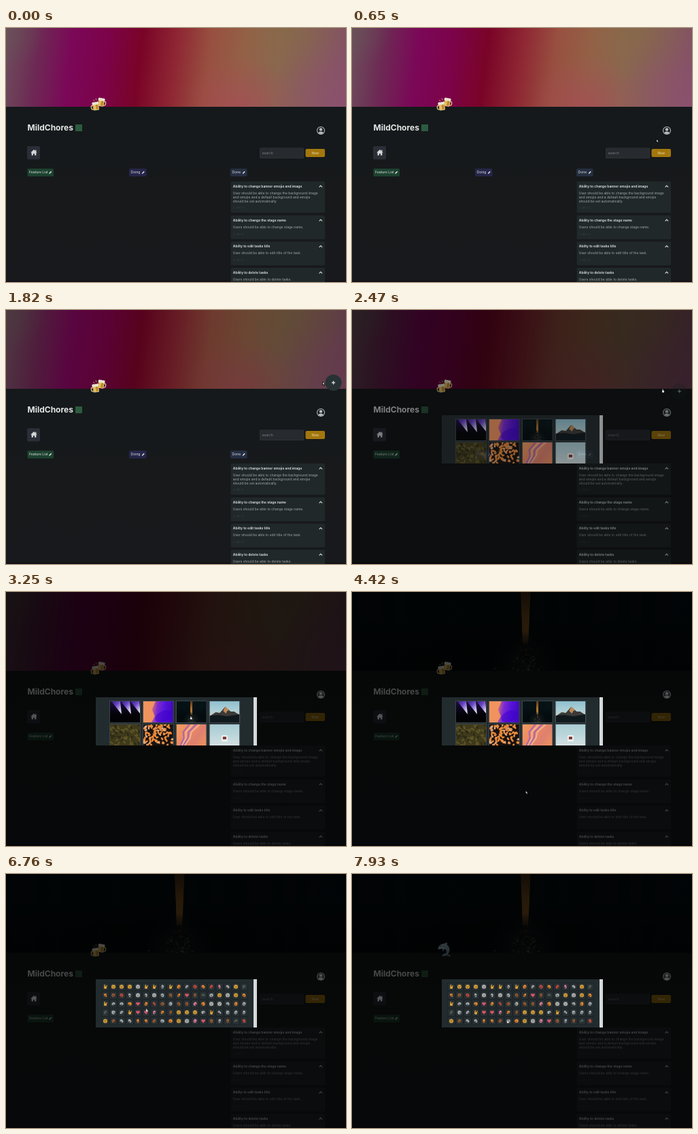
Animation of 500x374 px, one loop 8000 ms. Source, as an HTML page with a canvas:

```html
<!DOCTYPE html>
<html lang="en">
<head>
<meta charset="utf-8">
<title>Task board</title>
<style>
html, body { margin: 0; width: 100%; height: 100%; overflow: hidden; background: #17191b; }
canvas { display: block; width: 500px; height: 374px; }
</style>
</head>
<body>
<canvas id="stage"></canvas>
<script>
const W = 500, H = 374, LOOP = 8000, BANNER = 116;
const FONT = 'Inter, "Open Sans", sans-serif';
const canvas = document.getElementById('stage');
const scale = window.devicePixelRatio || 1;
canvas.width = W * scale;
canvas.height = H * scale;
const main = canvas.getContext('2d');
let g = main;

const clamp = v => Math.max(0, Math.min(1, v));
const ease = v => { v = clamp(v); return v * v * (3 - 2 * v); };
const pulse = (t, from, to, len) => ease((t - from) / len) * (1 - ease((t - to) / len));

function seeded(seed) {
  return () => {
    seed = (seed * 1664525 + 1013904223) % 4294967296;
    return seed / 4294967296;
  };
}
function rect(x, y, w, h, color, r = 0) {
  g.fillStyle = color;
  g.beginPath();
  g.roundRect(x, y, w, h, r);
  g.fill();
}
function oval(x, y, rx, ry, color, turn = 0) {
  g.fillStyle = color;
  g.beginPath();
  g.ellipse(x, y, rx, ry, turn, 0, 7);
  g.fill();
}
const disc = (x, y, r, color) => oval(x, y, r, r, color);
function poly(color, ...p) {
  g.fillStyle = color;
  g.beginPath();
  for (let i = 0; i < p.length; i += 2) g.lineTo(p[i], p[i + 1]);
  g.closePath();
  g.fill();
}
function line(color, width, ...p) {
  g.strokeStyle = color;
  g.lineWidth = width;
  g.beginPath();
  for (let i = 0; i < p.length; i += 2) g.lineTo(p[i], p[i + 1]);
  g.stroke();
}
function text(str, x, y, size, color, weight = 400, align = 'left') {
  g.font = `${weight} ${size}px ${FONT}`;
  g.textAlign = align;
  g.textBaseline = 'middle';
  g.fillStyle = color;
  g.fillText(str, x, y);
}
function blend(x0, y0, x1, y1, ...colors) {
  const fill = g.createLinearGradient(x0, y0, x1, y1);
  colors.forEach((c, i) => fill.addColorStop(i / (colors.length - 1), c));
  return fill;
}
function glow(x, y, r, rgb, a) {
  const fill = g.createRadialGradient(x, y, 0, x, y, r);
  fill.addColorStop(0, `rgba(${rgb},${a})`);
  fill.addColorStop(1, `rgba(${rgb},0)`);
  g.fillStyle = fill;
  g.fillRect(x - r, y - r, 2 * r, 2 * r);
}
function layer(w, h, draw) {
  const c = document.createElement('canvas');
  c.width = w * scale;
  c.height = h * scale;
  g = c.getContext('2d');
  g.scale(scale, scale);
  draw();
  g = main;
  return c;
}

const warmBanner = layer(W, BANNER, () => {
  rect(0, 0, W, BANNER, blend(0, 0, 500, 60, '#6d4e5b', '#6d2954', '#7b0758', '#7c0349',
    '#790427', '#8e2633', '#985040', '#936146', '#8b6650', '#875b5c', '#825164'));
  glow(345, 125, 85, '176,66,96', 0.55);
  glow(490, 110, 100, '150,80,120', 0.45);
  glow(425, 0, 80, '130,112,64', 0.4);
  glow(0, 0, 60, '100,85,85', 0.5);
});

const cityBanner = layer(W, BANNER, () => {
  const rnd = seeded(11);
  rect(0, 0, W, BANNER, blend(0, 0, 500, 0, '#06151a', '#07161a', '#081316', '#07151a', '#05131a'));
  for (let side = -1; side < 2; side += 2) {
    for (let i = 0; i < 14; i++) {
      const x = 254 + side * (11 + i * 18);
      const shade = 3 + rnd() * 6;
      rect(Math.min(x, x + side * 18), 0, 18, BANNER, `rgba(${shade},${shade + 12},${shade + 16},.55)`);
      for (let k = 0; k < 9; k++) {
        rect(x + side * rnd() * 16, rnd() * 72, 1, 1.6, `rgba(88,82,66,${0.08 + rnd() * 0.18})`);
      }
    }
  }
  rect(0, 0, W, BANNER, blend(0, 35, 0, 116, 'rgba(3,7,9,0)', 'rgba(3,7,9,.55)', 'rgba(3,7,9,.6)'));
  // Evening sky between the towers
  poly(blend(0, 0, 0, 76, '#5a3d1c', '#825424', '#ab712c', '#b37b30', '#3a2b1a'),
    247.5, 0, 262.5, 0, 261, 50, 259, 76, 250.5, 76, 250, 50);
  poly('#0a1012', 243, 0, 248, 0, 250.5, 72, 246, 76);
  poly('#0b1214', 262.5, 0, 267, 0, 264, 76, 259.5, 72);
  // Street traffic
  glow(255, 108, 50, '62,66,62', 0.4);
  for (let i = 0; i < 150; i++) {
    const d = rnd(), x = 255 + (rnd() + rnd() - 1) * (7 + d * d * 52);
    const warm = d < 0.5 ? '150,105,45' : '125,120,105';
    rect(x, 74 + d * 41, 1 + d * 2.5, 0.8 + d, rnd() < 0.4 ? `rgba(${warm},.5)` : 'rgba(7,12,14,.8)');
  }
});

// Board page
const cards = [
  [226, 46, 'Ability to change banner emojie and image',
    ['User should be able to change the background image', 'and emojie and a default background and emojie', 'should be set automatically.']],
  [276, 35, 'Ability to change the stage name', ['Users should be able to change stage name.']],
  [314.5, 35, 'Abilty to edit tasks title', ['User should be able to edit title of the task.']],
  [353, 35, 'Ability to delete tasks', ['Users should be able to delete tasks.']]
];

function pencil(x, y) {
  line('#e8e8ec', 1.5, x - 1.4, y + 1.4, x + 1.3, y - 1.3);
  disc(x - 1.6, y + 1.6, 0.5, '#e8e8ec');
}
function tag(x, w, label, color) {
  rect(x, 207, w, 11.5, color, 1.5);
  text(label, x + 2.6, 212.8, 5, '#dfe3e3');
  pencil(x + w - 4.6, 212.6);
}
function homeIcon() {
  poly('#d4d5d6', 36.2, 183.6, 41, 179, 45.8, 183.6, 44.4, 183.6, 44.4, 187.6, 42, 187.6,
    42, 185, 40, 185, 40, 187.6, 37.6, 187.6, 37.6, 183.6);
  rect(43.2, 179.6, 1.3, 2.4, '#d4d5d6');
}
function userIcon() {
  g.save();
  disc(463, 151, 6, '#b9bfc1');
  disc(463, 151, 5, '#1c2224');
  g.beginPath();
  g.arc(463, 151, 4.9, 0, 7);
  g.clip();
  disc(463, 149.4, 2.2, '#b9bfc1');
  oval(463, 155.4, 3.9, 3, '#b9bfc1');
  g.restore();
}
const page = layer(W, H, () => {
  rect(0, BANNER, W, H - BANNER, blend(0, BANNER, 0, H, '#15191b', '#17191b', '#18191c'));
  rect(0, 372, W, 2, '#121017');
  text('MildChores', 31.5, 147.3, 12, '#e4e6e6', 700);
  rect(102, 142, 10, 10, '#2c5b40');
  userIcon();
  rect(31, 174, 19, 19.5, '#2b2d37', 2);
  homeIcon();
  rect(373, 176.5, 65, 15.5, '#33383e', 2);
  rect(373.5, 177, 64, 14.5, '#272b30', 2);
  text('search', 376.5, 184.4, 5.1, '#7b8185');
  rect(440.5, 178, 28.5, 12, '#a3770e', 2);
  text('New', 454.8, 184.1, 4.9, '#e2cf96', 500, 'center');
  tag(31.5, 38.5, 'Feature List', '#1d4230');
  tag(181, 25.5, 'Doing', '#26264a');
  tag(330, 24.5, 'Done', '#262f42');
  for (const [y, h, title, lines] of cards) {
    rect(330.5, y, 138.5, h, '#20282a', 1.5);
    text(title, 333.8, y + 7.3, 4.95, '#e2e5e5', 600);
    lines.forEach((s, i) => text(s, 333.8, y + 17.4 + i * 5.9, 4.95, '#a3a9aa'));
    text('2 Jun 21', 334, y + h - 7.5, 4, '#394143');
    line('#d6dada', 1.2, 460.6, y + 8.4, 462.8, y + 6.2, 465, y + 8.4);
  }
});

// Banner emoji
function mug(x, y, turn) {
  g.save();
  g.translate(x, y);
  g.rotate(turn);
  const side = Math.sign(turn);
  g.strokeStyle = '#c8b98c';
  g.lineWidth = 1.4;
  g.beginPath();
  g.ellipse(side * 4.8, 1.2, 2.1, 3, 0, 0, 7);
  g.stroke();
  rect(-4.4, -4, 8.8, 10.2, '#d2c18a', 1.5);
  rect(-3.8, -3, 7.6, 8.2, '#d4a43a', 1);
  rect(-2.4, -2, 1.4, 7, '#f0d27c');
  rect(0.9, -2, 1.4, 7, '#a9772a');
  for (let i = -1; i < 2; i++) disc(i * 2.9, -4, 2.2, '#ebe5d2');
  g.restore();
}
function beers() {
  mug(140, 109.2, 0.16);
  mug(132, 115, -0.16);
  line('#cfb869', 0.8, 133, 106.5, 132, 103.5);
  line('#cfb869', 0.8, 130.5, 107.5, 128, 106);
}
function dolphin() {
  g.fillStyle = blend(128, 102, 142, 122, '#a9c2ce', '#86a5b5', '#65828f');
  g.beginPath();
  g.moveTo(126.2, 111);
  g.bezierCurveTo(127, 106, 131, 102.2, 136, 102.6);
  g.quadraticCurveTo(138, 100.6, 140.5, 101.6);
  g.quadraticCurveTo(139, 103, 140, 104.6);
  g.bezierCurveTo(145, 108.5, 144.6, 114, 141, 118);
  g.quadraticCurveTo(144.5, 119, 145, 122);
  g.quadraticCurveTo(141, 120, 139, 120);
  g.quadraticCurveTo(135, 121.6, 132.4, 120.4);
  g.quadraticCurveTo(134, 117, 138, 117);
  g.bezierCurveTo(140, 113, 138, 110, 134, 110);
  g.quadraticCurveTo(130, 110, 126.2, 111);
  g.fill();
  poly('#6f8f9e', 133, 109.5, 136.4, 110, 133.4, 114.8);
  line('#e0e9ec', 1, 128, 109.8, 132, 109, 136, 109.6);
  disc(130.8, 106.6, 0.7, '#182024');
}

// Picker window
const BOX = [132, 155, 237, 71];
function windowFrame() {
  rect(...BOX, '#222b2e');
  rect(364, 155, 5, 71, '#d5d9da');
}
const art = [
  () => {
    rect(0, 0, 44, 31, blend(0, 0, 0, 31, '#1c0f3c', '#0d0720', '#030206', '#020203'));
    for (let i = 0; i < 3; i++) {
      const x = i * 14;
      poly(blend(x, 0, x + 16, 14, '#2a1364', '#6a45c8', '#e0dcf0'), x + 2, 0, x + 15, 0, x + 17, 19);
    }
  },
  () => {
    rect(0, 0, 44, 31, blend(0, 0, 44, 6, '#f39257', '#ea8062', '#7b2bd0', '#5512d8', '#4209c0'));
    poly('#f1935e', 0, 0, 18, 0, 13, 12, 17, 22, 12, 31, 0, 31);
    oval(30, 22, 13, 8, 'rgba(62,0,205,.55)', -0.4);
  },
  () => g.drawImage(cityBanner, 170 * scale, 0, 170 * scale, BANNER * scale, 0, 0, 44, 31),
  () => {
    rect(0, 0, 44, 31, blend(0, 0, 0, 24, '#8fc0d0', '#a9ced6', '#c6d0cc'));
    poly('#3c3a38', 0, 22, 9, 16, 15, 17, 23, 8, 31, 15, 36, 15, 44, 20, 44, 31, 0, 31);
    poly('#c08a58', 23, 8, 29, 13, 26, 14, 24, 18, 20, 14);
    poly('#10191d', 0, 21, 13, 20, 26, 22, 44, 19, 44, 31, 0, 31);
  },
  () => {
    const rnd = seeded(5);
    rect(0, 0, 44, 31, '#403a1c');
    for (let i = 0; i < 55; i++) oval(rnd() * 44, rnd() * 31, 3, 1.2, rnd() < 0.5 ? '#5d5627' : '#2c2a16', rnd() * 3);
  },
  () => {
    const rnd = seeded(9);
    rect(0, 0, 44, 31, '#19120f');
    for (let i = 0; i < 95; i++) oval(rnd() * 44, rnd() * 31, 2.3, 1.4, rnd() < 0.75 ? '#e88a3b' : '#dba985', rnd() * 3);
  },
  () => {
    rect(0, 0, 44, 31, blend(0, 0, 44, 31, '#f0a060', '#f08b62', '#dd806f', '#f0925d'));
    for (let i = 0; i < 4; i++) line(i % 2 ? '#a868ae' : '#f5b38c', 2, 34 - i * 5, 0, 22 - i * 4, 11, 20 - i * 3, 20, 12 - i * 2, 31);
  },
  () => {
    rect(0, 0, 44, 31, blend(0, 0, 0, 31, '#a9ccd4', '#bad6db', '#d5e0e1'));
    rect(17.5, 16, 9, 9, '#eef0ef', 1);
    rect(19.5, 18, 5, 4, '#7d3b36');
  }
];
const gallery = layer(W, H, () => {
  windowFrame();
  g.beginPath();
  g.rect(...BOX);
  g.clip();
  art.forEach((draw, i) => {
    g.save();
    g.translate(153 + (i % 4) * 48.8, 161 + Math.floor(i / 4) * 34);
    rect(-1, -1, 46, 33, '#3a4347');
    g.beginPath();
    g.rect(0, 0, 44, 31);
    g.clip();
    draw();
    g.restore();
  });
});

// f face, h hand, v heart, w grey, s skull, r red, o orange, b brown, p pink, d dark
const emojiRows = [
  'hfffshhwhowrorpwfd',
  'obrwswswbovbdwfsfo',
  'hwwovorbwbbposswow',
  'dwwhvvpobfffwhwwww',
  'fbwwoobwofspvbwbdr'
];
const tones = {
  f: '#e2a93a', h: '#dda235', v: '#d55368', w: '#9da5a8', s: '#bcbfbf',
  r: '#b8483b', o: '#df842d', b: '#8e5731', p: '#d57b98', d: '#4b5c51'
};
function glyph(kind, x, y, rnd) {
  const c = tones[kind];
  if (kind === 'f' || kind === 's') {
    disc(x, y, 3, c);
    disc(x - 1.1, y - 0.7, 0.6, '#33291a');
    disc(x + 1.1, y - 0.7, 0.6, '#33291a');
    rect(x - 1.3, y + 1, 2.6, 0.7, '#56361f');
  } else if (kind === 'v') {
    disc(x - 1.3, y - 0.9, 1.6, c);
    disc(x + 1.3, y - 0.9, 1.6, c);
    poly(c, x - 2.7, y - 0.2, x + 2.7, y - 0.2, x, y + 3);
  } else if (kind === 'h') {
    rect(x - 1.9, y - 0.6, 3.9, 3.5, c, 1.2);
    line(c, 1.3, x - 1.2, y, x - 0.5, y - 3.2);
    line(c, 1.2, x + 1, y + 0.4, x + 2.6, y - 1.9);
  } else {
    oval(x, y, 2.8, 1.4 + rnd() * 1.2, c, rnd() * 3);
    oval(x + rnd() * 2 - 1, y - 1, 1.2, 1.8, c, rnd() * 3);
    disc(x + rnd() * 2 - 1, y + 0.8, 0.8, '#40302a');
  }
}
const emojis = layer(W, H, () => {
  const rnd = seeded(3);
  windowFrame();
  emojiRows.forEach((row, r) => [...row].forEach((kind, c) => {
    const x = 146 + c * 12, y = 166 + r * 12.6;
    rect(x - 5.4, y - 5.7, 10.8, 11.4, '#171d20', 1);
    rect(x - 4.9, y - 5.2, 9.8, 10.4, '#283033', 1);
    glyph(kind, x, y, rnd);
  }));
});

// Pointer: time, x, y
const path = [
  [360, 437, 196], [650, 448, 164], [1100, 449, 160], [1600, 464, 112], [1820, 466, 106],
  [2080, 479, 107], [2340, 480, 107], [2950, 288, 190], [3250, 272, 183], [3950, 272, 183],
  [4600, 252, 318], [4880, 252, 318], [5420, 136.5, 124.5], [5800, 136.5, 124.5], [6400, 184, 181],
  [6630, 184, 181], [6890, 229, 215], [8000, 229, 215]
];
function pointerAt(t) {
  let i = 0;
  while (i < path.length - 2 && t > path[i + 1][0]) i++;
  const [t0, x0, y0] = path[i], [t1, x1, y1] = path[i + 1];
  const k = ease((t - t0) / (t1 - t0));
  return [x0 + (x1 - x0) * k, y0 + (y1 - y0) * k];
}
function pointer(t) {
  if (t < 360) return;
  const [x, y] = pointerAt(t);
  const hand = (t > 2040 && t < 2500) || (t > 2950 && t < 4150) || (t > 5380 && t < 5900) || t > 6300;
  g.save();
  g.translate(x, y);
  if (hand) {
    rect(-1, -0.4, 1.8, 4, '#15181a', 0.8);
    rect(-1.7, 1.6, 4, 3.5, '#15181a', 1);
    rect(-0.6, 0, 1, 3.6, '#e8eaea', 0.5);
    rect(-1.2, 2, 3, 2.6, '#e8eaea', 0.8);
  } else {
    poly('#0b0d0e', -0.7, -1, -0.7, 5, 0.8, 4, 1.7, 5.8, 2.9, 5.2, 2.2, 3.5, 4, 3.4);
    poly('#d9dcdc', 0, 0.4, 0, 3.5, 0.9, 2.9, 1.7, 4.6, 2.2, 4.3, 1.4, 2.7, 2.5, 2.6);
  }
  g.restore();
}

function plusButton(p) {
  if (p <= 0) return;
  const y = 107 + 16 * (1 - p ** 3);
  g.globalAlpha = p ** 3;
  disc(481.5, y, 12, '#273235');
  g.globalAlpha = p;
  line('#dfe4e4', 1.3, 478.9, y, 484.1, y);
  line('#dfe4e4', 1.3, 481.5, y - 2.6, 481.5, y + 2.6);
  g.globalAlpha = 1;
}
function picker(image, p) {
  if (p <= 0) return;
  g.globalAlpha = p;
  rect(0, 0, W, H, 'rgba(0,0,0,.69)');
  g.globalAlpha = p * 0.12;
  homeIcon();
  userIcon();
  g.globalAlpha = p;
  g.drawImage(image, 0, 0, W, H);
  g.globalAlpha = 1;
}

function frame(now) {
  const t = now % LOOP;
  main.setTransform(scale, 0, 0, scale, 0, 0);
  g.drawImage(page, 0, 0, W, H);
  g.drawImage(t < 4030 ? warmBanner : cityBanner, 0, 0, W, BANNER);
  const dim = pulse(t, 1360, 4830, 300) + pulse(t, 5350, 9000, 350);
  rect(0, 0, W, BANNER, `rgba(0,0,0,${0.28 * dim})`);
  plusButton(pulse(t, 1360, 2340, 300) + pulse(t, 5310, 5800, 350));
  if (t < 7475) beers();
  else dolphin();
  picker(gallery, pulse(t, 2340, 4830, 220));
  picker(emojis, pulse(t, 5790, 9000, 220));
  pointer(t);
  requestAnimationFrame(frame);
}
requestAnimationFrame(frame);
</script>
</body>
</html>
```
